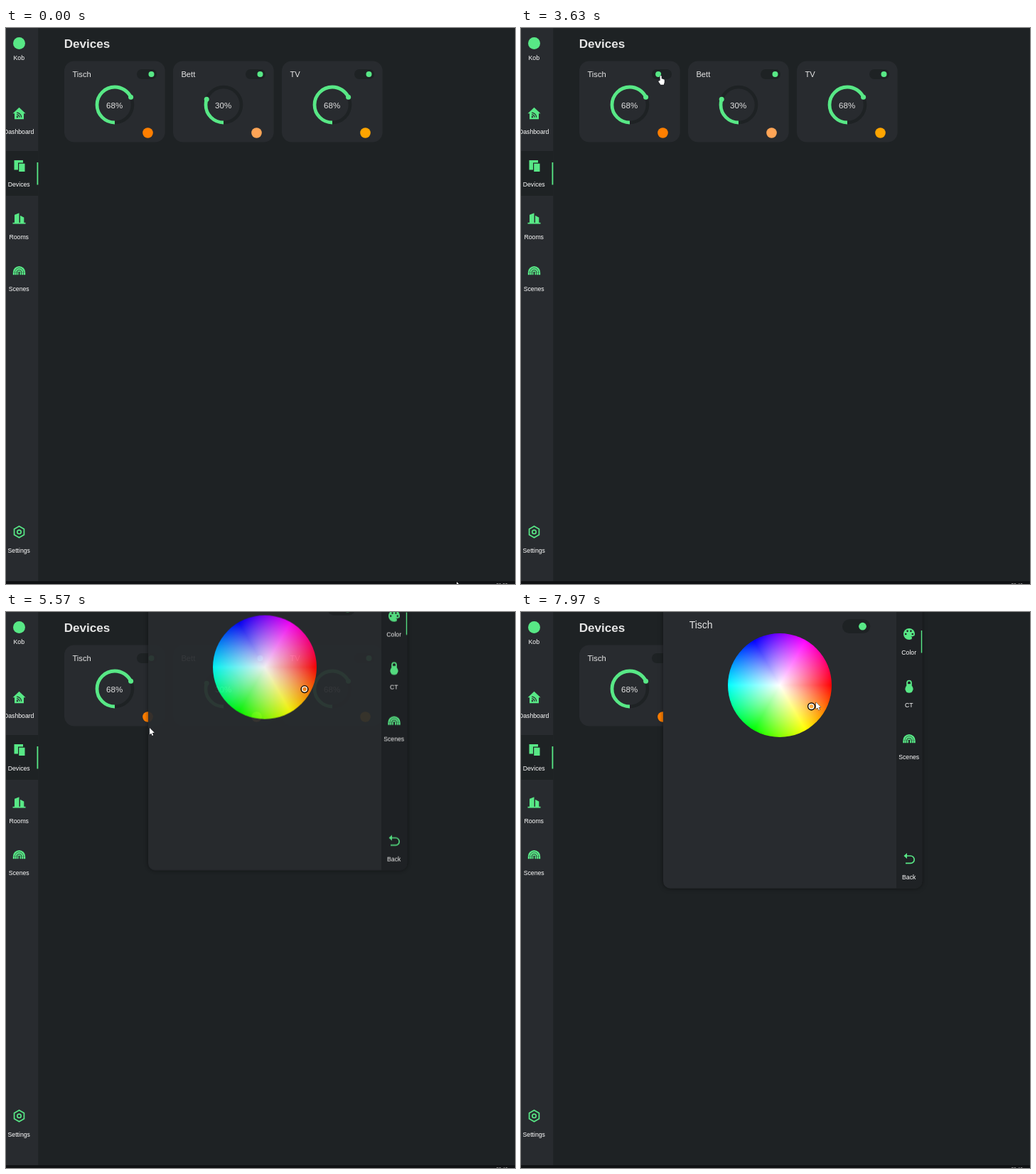
An HTML page with a canvas that plays this animation: 716x782 px, repeating every 8 s.

```html
<!DOCTYPE html>
<html lang="en">
<head>
<meta charset="utf-8">
<title>Devices</title>
<style>
html, body { margin: 0; width: 100%; height: 100%; overflow: hidden; background: #1e2224; }
canvas { display: block; }
</style>
</head>
<body>
<canvas id="stage" width="716" height="782"></canvas>
<script>
const W = 716, H = 782, LOOP = 8000, TAU = Math.PI * 2;
const BG = '#1e2224', PANEL = '#282b2f', MENU = '#1f2225', GREEN = '#58e886', TEXT = '#e6e6e6';
const NAV_GAP = 73.8, CARD_GAP = 153;
const main = document.getElementById('stage').getContext('2d');
let c = main;

// ---- drawing helpers ----
function rect(x, y, w, h, color) {
  c.fillStyle = color;
  c.fillRect(x, y, w, h);
}
function pill(x, y, w, h, r, color) {
  c.fillStyle = color;
  c.beginPath();
  c.roundRect(x, y, w, h, r);
  c.fill();
}
function disc(x, y, r, color) {
  c.fillStyle = color;
  c.beginPath();
  c.arc(x, y, r, 0, TAU);
  c.fill();
}
function arc(x, y, r, from, to, width, color) {
  c.strokeStyle = color;
  c.lineWidth = width;
  c.beginPath();
  c.arc(x, y, r, from, to);
  c.stroke();
}
function fill(d, color) {
  c.fillStyle = color;
  c.fill(new Path2D(d));
}
function line(d, width, color) {
  c.strokeStyle = color;
  c.lineWidth = width;
  c.stroke(new Path2D(d));
}
function label(str, x, y, size, align = 'left', weight = '', color = TEXT) {
  c.font = `${weight} ${size}px "Liberation Sans", Arial, sans-serif`;
  c.textAlign = align;
  c.fillStyle = color;
  c.fillText(str, x, y);
}
function at(x, y, draw) {
  c.save();
  c.translate(x, y);
  draw();
  c.restore();
}

// ---- icons, each around its own centre ----
const icons = {
  house(back) {
    fill('M0-8.5 9 0H6.5V8H-6.5V0H-9Z', GREEN);
    disc(-2.6, 4.8, 1.2, back);
    for (const r of [4, 6.6]) arc(-3.4, 5.6, r, -TAU / 4, 0, 1.2, back);
  },
  devices(back) {
    rect(-7, -8, 12.5, 13.5, GREEN);
    rect(-1.5, -4.5, 10.5, 13, back);
    rect(-0.3, -3.3, 8.3, 11.3, GREEN);
  },
  rooms() {
    fill('M-6.5-5 0-7.5V7H-6.5ZM1.5-4 6.8-1.2V7H1.5ZM-9 6H9V7.7H-9Z', GREEN);
  },
  rainbow() {
    for (let i = 0; i < 3; i++) {
      const r = 7.5 - 2.8 * i, w = 2.4 - 0.3 * i;
      arc(0, 2, r, Math.PI, TAU, w, GREEN);
      for (const side of [-r, r]) rect(side - w / 2, 1.9, w, 3.7, GREEN);
    }
  },
  gear() {
    c.beginPath();
    for (let a = TAU / 12; a < TAU; a += TAU / 6) c.lineTo(8 * Math.cos(a), 8 * Math.sin(a));
    c.closePath();
    c.strokeStyle = GREEN;
    c.lineWidth = 1.7;
    c.stroke();
    arc(0, 0, 2.7, 0, TAU, 1.7, GREEN);
  },
  palette(back) {
    disc(0, 0, 8, GREEN);
    fill('M1 9 1.5 3.5 5 2.5H9V9Z', back);
    disc(4.3, 1.3, 2.2, GREEN);
    disc(1.6, 5.4, 2.4, GREEN);
    for (let i = 0; i < 4; i++) {
      const a = Math.PI + i * 1.05;
      disc(4.8 * Math.cos(a), 4.8 * Math.sin(a), 1.3, back);
    }
  },
  thermometer(back) {
    pill(-3.8, -9, 7.6, 11, 3.8, GREEN);
    pill(-2, -7.2, 4, 5, 2, back);
    rect(-2, -3.6, 4, 3, GREEN);
    disc(0, 3.4, 5.6, GREEN);
  },
  back() {
    line('M-4-4H2A5.2 5.2 0 0 1 2 6.4H-5', 1.7, GREEN);
    fill('M-7.5-4-3-8V0Z', GREEN);
  }
};
function navItem(icon, str, x, y, back) {
  at(x, y, () => {
    icons[icon](back);
    label(str, -0.3, 28.7, 8.7, 'center', '', '#fff');
  });
}

// ---- page ----
function sidebar() {
  rect(0, 0, 45.3, 778, PANEL);
  rect(0, 173, 45.3, 63, BG);
  rect(43.5, 189, 1.8, 31.5, GREEN);
  disc(18.5, 21.5, 8.5, GREEN);
  label('Kob', 18.3, 45, 8.7, 'center', '', '#fff');
  const items = { house: 'Dashboard', devices: 'Devices', rooms: 'Rooms', rainbow: 'Scenes' };
  Object.entries(items).forEach(([icon, str], i) =>
    navItem(icon, str, 18.5, 120.2 + i * NAV_GAP, icon === 'devices' ? BG : PANEL));
  navItem('gear', 'Settings', 18.5, 708.8, PANEL);
}
function card(x, { name, percent, color }, off) {
  at(x, 46.5, () => {
    pill(0, 0, 141.7, 114, 14, PANEL);
    label(name, 11.4, 22.3, 11.2);
    pill(102, 11.5, 28, 14, 7, BG);
    disc(122.5 - 14.5 * off, 18.5, 4, GREEN);
    const start = TAU / 4, end = start + TAU * percent / 100;
    arc(71, 61.5, 25, 0, TAU, 4.6, BG);
    arc(71, 61.5, 25, start, end, 4.8, GREEN);
    disc(71 + 25 * Math.cos(end), 61.5 + 25 * Math.sin(end), 3.5, GREEN);
    label(percent + '%', 70.6, 66, 11.5, 'center');
    disc(117.5, 101, 7.3, color);
  });
}
const lamps = [
  { name: 'Tisch', percent: 68, color: '#ff7f00' },
  { name: 'Bett', percent: 30, color: '#ffa556' },
  { name: 'TV', percent: 68, color: '#ffa500' }
];

// ---- popup, painted once ----
const WHEEL = { x: 364, y: 103, r: 73 };
function wheel({ x, y, r }) {
  const hues = c.createConicGradient(0, x, y);
  for (let i = 0; i <= 12; i++) hues.addColorStop(i / 12, `hsl(${i * 30}, 100%, 50%)`);
  disc(x, y, r, hues);
  const white = c.createRadialGradient(x, y, 0, x, y, r);
  white.addColorStop(0, '#fff');
  white.addColorStop(1, 'rgba(255,255,255,0)');
  disc(x, y, r, white);
}
function makePopup() {
  const layer = document.createElement('canvas');
  layer.width = W;
  layer.height = H;
  c = layer.getContext('2d');
  c.shadowColor = 'rgba(0,0,0,.5)';
  c.shadowBlur = 6;
  pill(200, -20, 364.3, 408.7, 10, PANEL);
  c.shadowBlur = 0;
  pill(528, -20, 36.3, 408.7, [0, 0, 10, 0], MENU);
  label('Tisch', 236.7, 23.3, 14);
  pill(452, 10.3, 39.3, 19.7, 9.8, BG);
  disc(480.5, 20.2, 5.4, GREEN);
  wheel(WHEEL);
  const items = { palette: 'Color', thermometer: 'CT', rainbow: 'Scenes' };
  Object.entries(items).forEach(([icon, str], i) =>
    navItem(icon, str, 546, 31 + i * NAV_GAP, MENU));
  navItem('back', 'Back', 546, 347, MENU);
  rect(562.8, 26, 1.4, 31.5, GREEN);
  c = main;
  return layer;
}

// ---- motion ----
// The pointer glides to each place, then rests until the next glide.
const glides = [
  { from: 0, to: 230, x: 226, y: 555 },
  { from: 455, to: 860, x: 41, y: 340 },
  { from: 1005, to: 1230, x: 21, y: 256 },
  { from: 1230, to: 1540, x: 28, y: 202 },
  { from: 1695, to: 2230, x: 199, y: 151 },
  { from: 2705, to: 3100, x: 193, y: 67 },
  { from: 4200, to: 5030, x: 191, y: 141 },
  { from: 5340, to: 5569, x: 202, y: 163 },
  { from: 5569, to: 5724, x: 215, y: 157 },
  { from: 5724, to: 6040, x: 508, y: 106 },
  { from: 6045, to: 6350, x: 547, y: 133 },
  { from: 7045, to: 7350, x: 418, y: 130 },
  { from: 7350, to: 7590, x: 325, y: 78 },
  { from: 7590, to: 7890, x: 358, y: 139 },
  { from: 7892, to: 7970, x: 415, y: 127 }
];
const GRAB = 7350;
function pointerAt(t) {
  let x = 634, y = 779;
  for (const g of glides) {
    const p = Math.min(Math.max((t - g.from) / (g.to - g.from), 0), 1);
    const k = 1 - (1 - p) ** 2;
    x += (g.x - x) * k;
    y += (g.y - y) * k;
  }
  return { x, y };
}
// The picker trails the pointer a little while it is dragged.
function pickerAt(t) {
  const { x, y } = pointerAt(Math.max(t - 30, GRAB));
  return { x: x + 2, y: y + 4 };
}
// cubic-bezier(.25, .1, .25, 1), solved by bisection
function ease(p) {
  if (p <= 0) return 0;
  if (p >= 1) return 1;
  const curve = (a, b, s) => 3 * a * s * (1 - s) ** 2 + 3 * b * s * s * (1 - s) + s ** 3;
  let lo = 0, hi = 1;
  for (let i = 0; i < 20; i++) {
    const mid = (lo + hi) / 2;
    if (curve(0.25, 0.25, mid) < p) lo = mid; else hi = mid;
  }
  return curve(0.1, 1, lo);
}

// ---- pointer ----
const arrow = new Path2D('M0 0V9.6L2.2 7.6 3.7 11 5.2 10.3 3.7 7.1 6.8 6.8Z');
const hand = new Path2D('M2.6 7V1.2Q2.6 0 3.6 0T4.7 1.2V4.4Q5.6 3.9 6.2 4.8' +
  'Q7.1 4.4 7.5 5.2Q8.8 5 8.8 6.4V9.2L7.8 12.8H3.4L.4 8.6Q0 7.4 1.2 7.2Z');
function pointer(t) {
  const { x, y } = pointerAt(t);
  const onToggle = t < 5000 && y > 56 && y < 74;
  const onSwatch = t > 5000 && t < 5350;
  const onMenu = t > 6000 && x > 528;
  const path = x < 36 || onToggle || onSwatch || onMenu ? hand : arrow;
  at(x, y, () => {
    c.lineJoin = 'round';
    c.lineWidth = 1;
    c.strokeStyle = '#15171a';
    c.stroke(path);
    c.fillStyle = '#fff';
    c.fill(path);
  });
}

const popup = makePopup();
function draw(t) {
  rect(0, 0, W, H, BG);
  sidebar();
  label('Devices', 81.7, 28.3, 17.1, 'left', 'bold');
  const off = ease((t - 3440) / 400) - ease((t - 4240) / 400);
  lamps.forEach((lamp, i) => card(82 + i * CARD_GAP, lamp, i ? 0 : off));

  const shown = ease((t - 5253) / 460);
  if (shown > 0) {
    c.save();
    c.globalAlpha = shown;
    c.translate(0, -389 * (1 - shown));
    c.drawImage(popup, 0, 0);
    const { x, y } = pickerAt(t);
    arc(x, y, 4.8, 0, TAU, 1.6, '#000');
    arc(x, y, 3.4, 0, TAU, 1.3, '#fff');
    c.restore();
  }
  rect(0, 778, W, 4, '#101214');
  label(t < 2540 ? '20:39' : '20:40', 689.5, 785.5, 6.5, 'left', '', '#ccc');
  pointer(t);
}

// The screen refreshes in steps
const STEP = 77.45;
function tick() {
  const t = performance.now() % LOOP;
  const k = Math.floor((t - 55) / STEP);
  draw(k < 0 ? 0 : 70 + k * STEP);
  requestAnimationFrame(tick);
}
tick();
</script>
</body>
</html>
```
